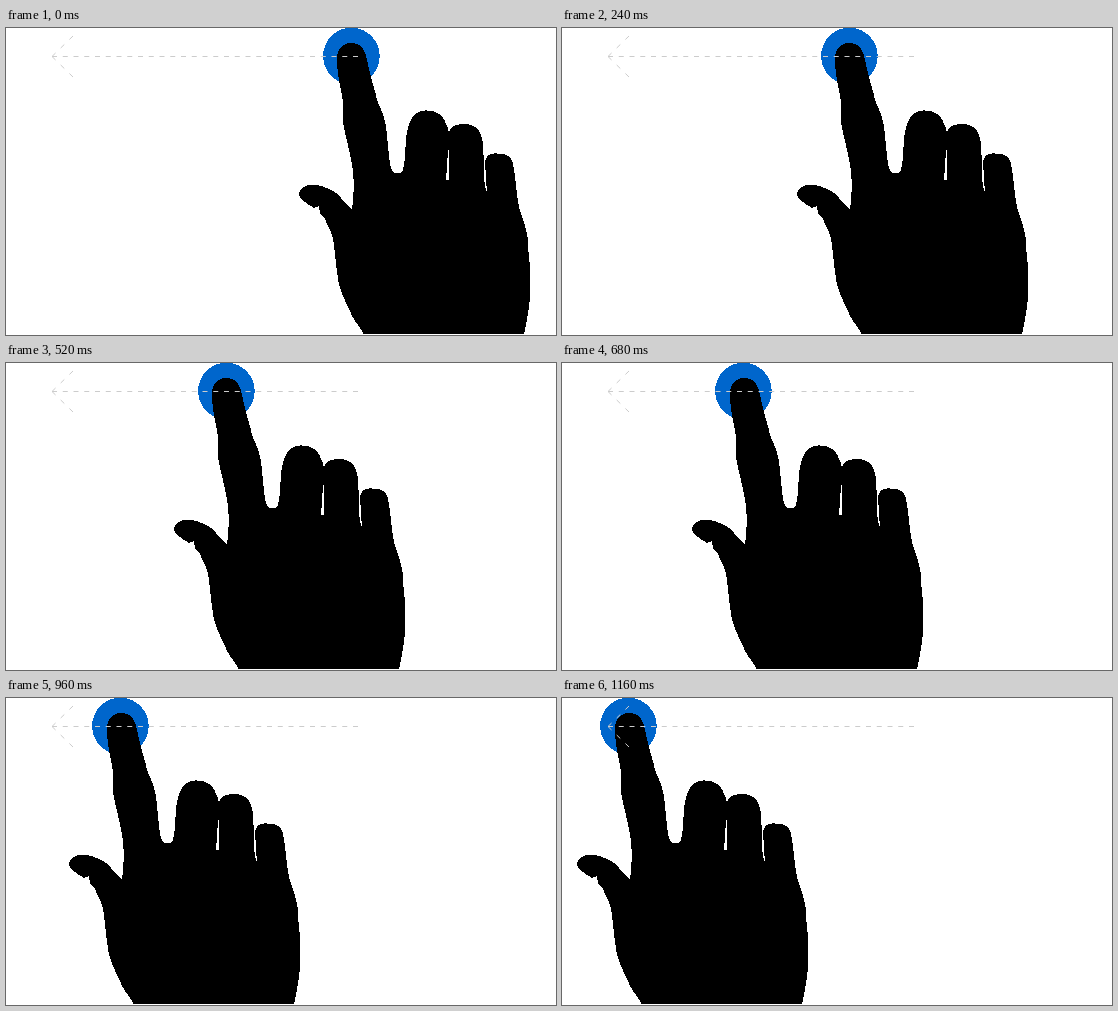
Animation, 550 px wide and 307 px high, one loop 1.2 s. Source, as an HTML page with a canvas:

```html
<!DOCTYPE html>
<html lang="en">
<head>
<meta charset="utf-8">
<title>Swipe left</title>
<style>
html, body { margin: 0; width: 100%; height: 100%; overflow: hidden; background: #fff; }
canvas { display: block; }
</style>
</head>
<body>
<canvas id="stage" width="550" height="307"></canvas>
<script>
const W = 550, H = 307, LOOP = 1200, STEP = 40;
const HAND_TRAVEL = 278.4, DOT_TRAVEL = 279.2;
const ctx = document.getElementById('stage').getContext('2d');

const handPath = new Path2D(`
  M331 31 C331 21 337 15 345 15 C353 15 359 20 360.5 30
  C363 42 366 53 369.5 65 C371 76 377.5 83 379.5 96
  C382 111 382 126 385 140 C387 147 395 147 397 142
  C400 131 399 113 401 104 C403 92 409 82 420 82.5
  C432 82 438 89 440 96 C443 101 444 109 443 118
  C441 131 441 141 440 152 L443 152 L443 104
  C446 97 450 96 458 96.5 C467 95 473 101 475 107
  C478 115 477 124 478 135 C477 146 478 156 481 166
  L480 150 L479 133 C481 126 486 125 491 125.5
  C500 126 505 127 507 136 C510 149 510 166 513.5 181
  C517 193 521 201 522 213 C522 228 525 239 524.5 253
  C525 273 521 291 518 307 L358 307
  C355 300 350 295 346 288 C342 277 335 267 332.5 254
  C330 239 329 224 327 210 C324 201 321 196 318 189
  L314 186 L313 178 L308 180 C302 176 294 172 293 166
  C293 161 299 157 306 156.5 C316 157 324 161 330 165
  C336 170 340 177 346 181 C348 168 348 155 347 143
  C345 127 340 111 337 95 C337 84 338 75 335 62
  C333 52 331 43 331 31 Z`);

const dotPath = new Path2D();
dotPath.arc(345.4, 28, 28.3, 0, Math.PI * 2);

const arrow = [[46, 28.5, 352, 28.5], [46, 28.5, 67, 8], [46, 28.5, 67, 49]];

// Fills a path once with hard, unsmoothed edges.
function hardSprite(path, color) {
  const canvas = document.createElement('canvas');
  canvas.width = W;
  canvas.height = H;
  const c = canvas.getContext('2d');
  c.fillStyle = color;
  c.fill(path);
  const image = c.getImageData(0, 0, W, H);
  for (let i = 3; i < image.data.length; i += 4) {
    image.data[i] = image.data[i] > 127 ? 255 : 0;
  }
  c.putImageData(image, 0, 0);
  return canvas;
}

const dot = hardSprite(dotPath, '#06c');
const hand = hardSprite(handPath, '#000');

// Dashed line with a whole dash at both ends.
function dashedLine(x1, y1, x2, y2) {
  const dash = 5, span = Math.hypot(x2 - x1, y2 - y1) - dash;
  const period = span / Math.round(span / 10.75);
  ctx.setLineDash([dash, period - dash]);
  ctx.beginPath();
  ctx.moveTo(x1, y1);
  ctx.lineTo(x2, y2);
  ctx.stroke();
}

function draw(now) {
  const progress = Math.floor((now % LOOP) / STEP) / (LOOP / STEP - 1);
  ctx.fillStyle = '#fff';
  ctx.fillRect(0, 0, W, H);
  ctx.drawImage(dot, -Math.round(DOT_TRAVEL * progress), 0);
  ctx.drawImage(hand, -Math.round(HAND_TRAVEL * progress), 0);
  ctx.fillStyle = '#fff';
  ctx.fillRect(0, H - 1, W, 1);
  ctx.strokeStyle = '#ccc';
  ctx.lineWidth = 1;
  for (const line of arrow) dashedLine(...line);
}

const start = performance.now();
function tick() {
  draw(performance.now() - start);
  requestAnimationFrame(tick);
}
tick();
</script>
</body>
</html>
```
